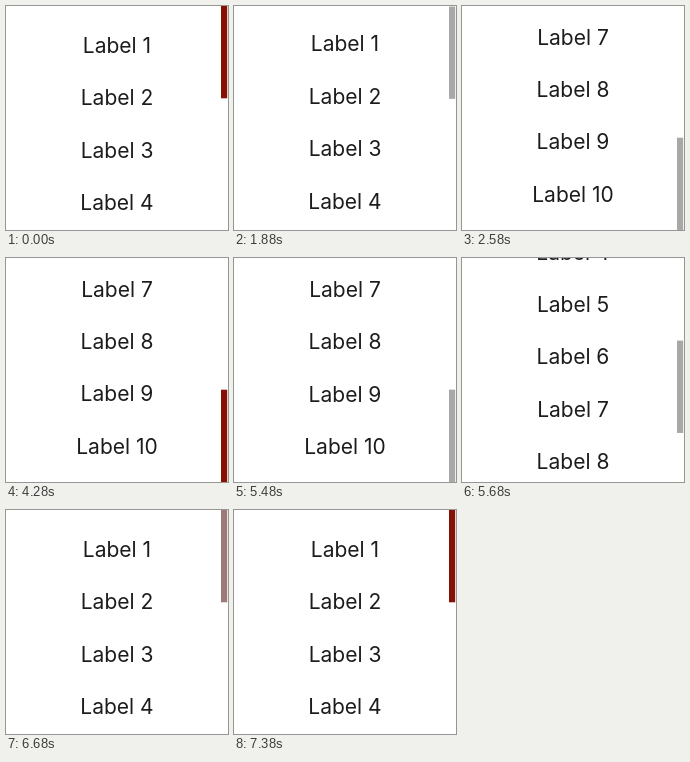
These frames come from a looping animation (222 px wide and 224 px high, 7.58 s). An HTML page with a canvas:

```html
<!DOCTYPE html>
<html lang="en">
<head>
<meta charset="utf-8">
<title>Label list</title>
<style>
  html, body { margin: 0; width: 100%; height: 100%; overflow: hidden; background: #fff; }
  canvas { display: block; width: 222px; height: 224px; }
</style>
</head>
<body>
<canvas id="stage"></canvas>
<script>
const W = 222, H = 224, LOOP = 7580, TICK = 100, PHASE = 80;
const ROW = 52.4, BASELINE = 46.7, ROWS = 10;
const MAX_SCROLL = 322.5, THUMB_X = 215, THUMB_W = 6.2, THUMB_H = 92.3;
const GREY = [168, 168, 168], RED = [132, 16, 6];
const SPRING = 0.013, FADE = 240;

// Each drag runs past the edge by `over`, then springs back.
const DOWN = { start: 1840, drag: 330, over: 8, fade: 2940 };
const UP = { start: 5450, drag: 460, over: 3, fade: 6640 };

const canvas = document.getElementById('stage');
const ctx = canvas.getContext('2d');
const ratio = window.devicePixelRatio || 1;
canvas.width = W * ratio;
canvas.height = H * ratio;
ctx.scale(ratio, ratio);

const clamp = (v, lo, hi) => Math.min(hi, Math.max(lo, v));
const smoother = p => p * p * p * (p * (6 * p - 15) + 10);

function travel({ start, drag, over }, t) {
  const p = clamp((t - start) / drag, 0, 1);
  if (p < 1) return (MAX_SCROLL + over) * smoother(p ** 1.22);
  const s = (t - start - drag) * SPRING;
  const rest = over * (1 + s) * Math.exp(-s);
  return MAX_SCROLL + (rest > 0.45 ? rest : 0);
}

// 0 while the list is moving, 1 once the thumb has turned red again.
function redness(t) {
  if (t < DOWN.start) return 1;
  const { fade } = t < UP.start ? DOWN : UP;
  const p = clamp((t - fade) / FADE, 0, 1);
  return 1 - (1 - p) ** 2;
}

function draw(t) {
  const scroll = travel(DOWN, t) - travel(UP, t);
  ctx.fillStyle = '#fff';
  ctx.fillRect(0, 0, W, H);

  ctx.fillStyle = '#1c1c1c';
  ctx.font = '400 21px Inter, sans-serif';
  ctx.textAlign = 'center';
  for (let i = 0; i < ROWS; i++) {
    const y = BASELINE + i * ROW - scroll;
    if (y > -10 && y < H + 20) ctx.fillText('Label ' + (i + 1), W / 2, y);
  }

  const k = redness(t);
  const rgb = GREY.map((g, i) => Math.round(g + (RED[i] - g) * k));
  ctx.fillStyle = `rgb(${rgb})`;
  const top = clamp(scroll / MAX_SCROLL, 0, 1) * (H - THUMB_H);
  ctx.fillRect(THUMB_X, top, THUMB_W, THUMB_H);
}

function frame(now) {
  const t = now % LOOP;
  draw(Math.max(0, Math.floor((t - PHASE) / TICK) * TICK + PHASE));
  requestAnimationFrame(frame);
}
requestAnimationFrame(frame);
</script>
</body>
</html>
```
